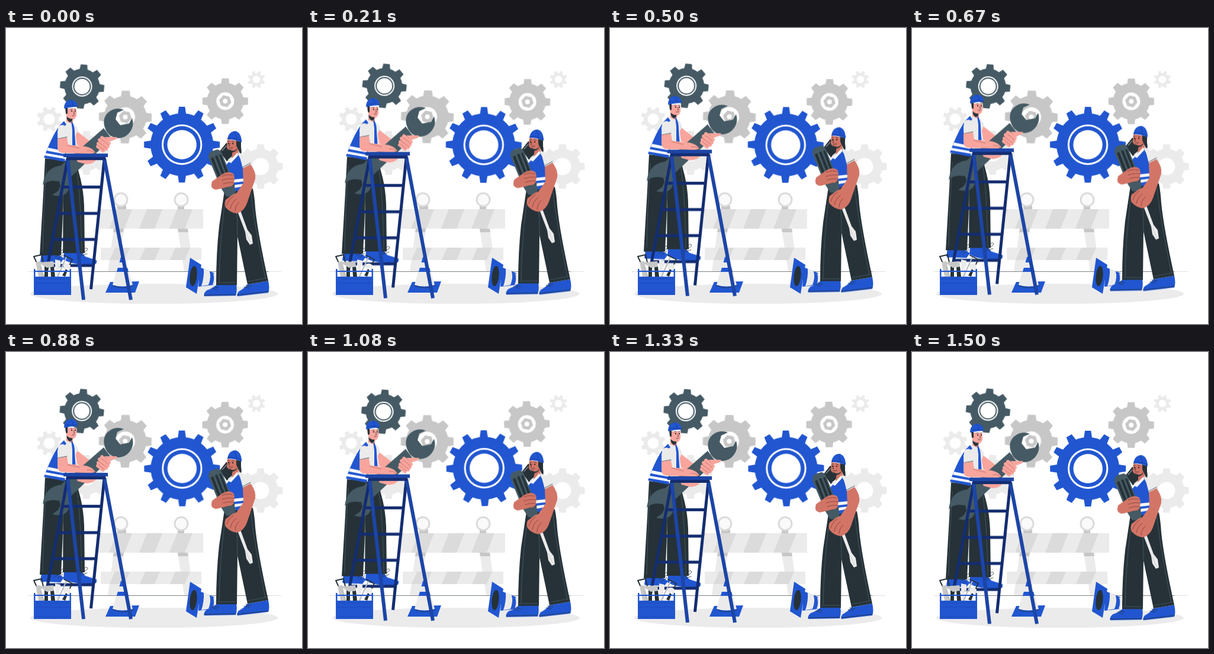
These frames come from a looping animation (500x500 px, 1540 ms). An HTML page:

```html
<!DOCTYPE html>
<html lang="en">
<head>
<meta charset="utf-8">
<title>Maintenance</title>
<style>
html, body { margin: 0; width: 100%; height: 100%; overflow: hidden; background: #fff; }
svg { display: block; width: 100vw; height: 100vh; }
.float { animation: float 1540ms linear -20ms infinite; }
.sway { transform-origin: 250px 161px; animation: sway 1540ms linear -20ms infinite; }
@keyframes float { from, to { transform: translateY(.4px); } 50% { transform: translateY(-9.6px); } }
@keyframes sway { 25% { transform: rotate(1deg); } 75% { transform: rotate(-1deg); } }
.blue { fill: #2156d0; }
.dark { fill: #263238; }
.steel { fill: #455a64; }
.pale { fill: #ebebeb; }
.grey { fill: #dbdbdb; }
.mid { fill: #c7c7c7; }
.white { fill: #fff; }
.peach { fill: #f8a59d; }
.tan { fill: #d27567; }
.line { fill: none; stroke: #263238; stroke-width: .8; stroke-linecap: round; stroke-linejoin: round; }
.seam { fill: none; stroke: #50666f; stroke-width: .7; }
</style>
</head>
<body>
<svg viewBox="0 0 500 500">
  <g id="far"></g>

  <ellipse cx="250" cy="449" rx="209" ry="17" class="pale"/>
  <path class="line" style="stroke-width:.6" d="M47 411.500H443"/>
  <path class="line" style="stroke-width:.6;opacity:.25" d="M37 411.500H47M443 411.500H465"/>

  <g id="near" class="sway"></g>

  <g id="barrier">
    <path class="pale" d="M182 339H199L189 411H172ZM290 339H307L317 411H301Z"/>
    <path class="mid" d="M182 339H199L198 345H181ZM290 339H307L308 345H291ZM188 300H203V306H188ZM290 300H301V306H290Z"/>
    <g fill="#fafafa" stroke="#dbdbdb" stroke-width="3">
      <circle cx="194" cy="290" r="11"/><circle cx="296" cy="290" r="11"/>
    </g>
    <path class="pale" d="M155 306H333V339H155ZM160 371H330V392H160Z"/>
    <path class="grey" d="M187 306H213L200 339H174ZM238 306H264L251 339H225ZM289 306H315L302 339H276ZM155 306H162L155 324Z"/>
    <path class="grey" d="M184 371H209L200 392H175ZM235 371H260L251 392H226ZM286 371H311L302 392H277Z"/>
  </g>

  <g id="cone">
    <path class="blue" d="M176 429L225 428L218 447H168Z"/>
    <path class="blue" d="M194 387Q197 385 200 387L214 436Q197 441 180 436Z"/>
    <path class="pale" d="M191 396H203L206 405H188ZM186 412H208L214 434Q197 439 180 434Z"/>
    <path class="line" d="M180 435Q197 443 215 435"/>
  </g>

  <g id="worker" class="float">
    <path class="blue" d="M60 382L58 394Q59 397 66 396L92 397L98 389L87 382Z"/>
    <path class="blue" d="M98 379L97 391Q110 399 132 399H150Q154 398 153 392L134 386L128 379Z"/>
    <path class="line" d="M83 387L91 382M87 390L96 383M122 383L133 379M125 385L137 381M90 380Q96 371 98 376T91 380M130 378Q133 370 137 372T131 379"/>
    <path class="dark" d="M66 220L119 226Q122 241 126 255Q131 276 132 300L133 380H96L97 292L93 384H57L63 280Z"/>
    <path class="seam" d="M98 262Q96 284 96 310L97 376M68 235Q63 310 62 378M118 234Q126 270 128 378"/>

    <path class="peach" d="M116 171L149 197L158 188L165 202L146 208L120 197Z"/>
    <path class="pale" d="M113 161Q119 164 122 172L117 183Z"/>
    <path class="peach" d="M102 152H113V163L108 169L101 163Z"/>
    <path class="pale" d="M88 165L103 158L113 163L118 210H88Z"/>
    <path class="blue" d="M98 157L91 164Q78 181 64 219L99 226L102 207H88V186L87 174L102 163ZM110 156Q116 163 116 176L118 206H112L112 172Z"/>
    <path class="white" d="M71 202L100 208V213L69 207ZM67 211L100 217V221L65 215Z"/>

    <path class="peach" d="M101 136H118Q121 147 117 152Q113 156 106 155Q100 148 101 136Z"/>
    <path class="dark" d="M100 135H104L104 144Q103 146 101 144ZM102 149Q107 154 112 153Q113 157 108 159Q103 157 102 149Z"/>
    <path class="blue" d="M98 136Q98 123 109 121Q121 122 121 133Q111 133 98 136Z"/>
    <path class="line" style="stroke:#173b95" d="M100 132Q110 129 121 132M109 122Q113 124 113 131"/>
    <circle cx="111" cy="140" r="1"/><circle cx="117" cy="140" r="1"/>
    <path class="line" d="M109 137L112 136.500M116 136.500L118 137M114 141L116 144L114 145M112 148Q115 149 116 147"/>

    <path class="steel" d="M165 169L93 232Q66 235 62 265Q69 258 80 258L90 259L92 267L88 275L78 282Q92 286 102 279Q109 271 109 252L178 187Z"/>
    <path class="steel" d="M199 138Q184 132 172 143Q162 153 167 168Q173 185 190 186Q206 185 213 169Q216 162 213 152L208 161L193 164L185 154L188 143Z"/>
    <path class="peach" d="M166 184L187 184Q189 187 183 189L174 192Z"/>
    <path fill="none" stroke="#f8a59d" stroke-width="5.800" stroke-linecap="round" d="M162 185L174 195M158 189L172 200M156 195L169 204M155 200L164 207"/>
    <path class="line" style="stroke:#b9655f" d="M161 188Q168 192 173 198M157 193Q164 198 170 203M156 198Q161 203 166 206"/>
    <path class="pale" d="M88 166Q97 160 102 168L103 185L87 187Z"/>
    <path class="line" d="M87 187L103 184"/>
    <path class="peach" d="M87 187L103 185L105 197L135 200Q145 202 151 210Q146 213 136 212L98 211Q87 211 87 202ZM118 220Q135 217 152 223Q148 229 136 230L121 226Z"/>
    <path class="line" style="stroke:#b9655f" d="M104 198L124 203M137 207Q144 206 149 210"/>

    <g fill="none" stroke="#142d70" stroke-width="5">
      <path d="M104 222L67 419M166 222L143.500 441"/>
      <path d="M95 268.500H160M87 313H156M79 357H152M71 401H148"/>
    </g>
    <path fill="none" stroke="#1c45a6" stroke-width="6" d="M104 220L131 459M166 220L211 459"/>
    <path fill="#1c45a6" d="M97 212H172V218H97Z"/>
    <path fill="#142d70" d="M102 218H168V223H102Z"/>
  </g>

  <g id="toolbox">
    <path class="line" style="stroke-width:2" d="M53 399L47 386L60 383L63 396"/>
    <path class="mid" d="M50 395L58 394L64 420H55Z"/>
    <path class="dark" d="M65 397L71 396V420H65ZM75 404L81 403L83 420H76ZM95 418L101 407L104 409L100 420Z"/>
    <path class="mid" d="M55 396L80 394L81 403L69 405Z"/>
    <path class="pale" d="M83 391L92 393L92 403L83 404ZM84 402H89L91 420H85ZM96 400Q104 395 109 401L108 409L102 405L99 411Z"/>
    <path class="line" style="stroke:#b5bcc0;stroke-width:2" d="M102 387L87 420M58 404L64 420"/>
    <path class="line" style="stroke-width:1.700" d="M98 384L112 391L108 399"/>
    <path class="blue" d="M47 407H49.500V420H107.500V407H110V451H47Z"/>
    <path class="blue" d="M47 410H110V412H47Z"/>
    <path class="line" style="stroke:#1a47b4" d="M50 424H107M50 431H107M50 447H107"/>
  </g>

  <g id="fallen-cone">
    <path class="blue" d="M327 404L352 414Q356 423 351 434L325 437Z"/>
    <path class="pale" d="M334 406L344 411Q347 422 342 434L330 436Q335 421 334 406ZM350 414L354 416Q357 424 353 433L349 434Q353 424 350 414Z"/>
    <path class="blue" d="M311 388L330 400L322 449L304 438Z"/>
    <ellipse class="dark" cx="316.500" cy="419" rx="6" ry="17" transform="rotate(6 316.500 419)"/>
  </g>

  <g id="engineer" class="float">
    <path class="blue" d="M357 432Q351 439 339 443Q333 448 335 453L388 452Q391 443 389 432ZM408 433Q402 440 393 445Q389 450 391 453L443 447Q446 440 443 427Z"/>
    <path class="line" d="M335 451L388 450M391 451L443 445M351 437L359 439M348 439L356 442M405 434L414 436M402 437L411 439"/>
    <path class="dark" d="M369 275L417 271Q420 286 421 304Q425 345 443 427L408 433L391 352L390 434H355Q355 380 360 335Z"/>
    <path class="seam" d="M388 296Q392 325 391 352M414 279Q417 318 438 423M369 300Q361 365 360 429M409 428L441 422M357 430H389"/>

    <path class="dark" d="M372 194L361 208L373 225L391 211L394 202H397Q399 211 396 215L391 201Z"/>
    <path class="line" style="stroke:#fff" d="M372 199L365 207"/>
    <path class="pale" d="M375 222L390 210Q405 213 413 229L402 242V269L385 272Z"/>
    <path class="tan" d="M383 205L392 201L393 211L381 222Z"/>
    <path class="blue" d="M372 231L380 222L391 212Q400 225 402 240V273L386 276Z"/>
    <path class="white" d="M376 226L391 210L392 215L380 228ZM382 256L402 254V259L384 261ZM385 265L402 263V267L386 270Z"/>

    <path class="tan" d="M374 188L393 191Q394 203 387 208Q378 210 373 202Z"/>
    <path class="dark" d="M389 190L397 192L397 210Q391 205 389 198ZM376 204Q384 211 391 203Q389 209 382 210Q378 209 376 204Z"/>
    <path class="blue" d="M374 188Q376 174 388 174Q398 177 398 193Q387 188 374 188Z"/>
    <path class="line" style="stroke:#173b95" d="M375 186Q386 185 398 190M384 175Q389 178 389 186"/>
    <circle cx="376" cy="195" r="1"/><circle cx="383" cy="195" r="1"/>
    <path class="line" d="M374 192L377 191.500M382 191L385 192M378 195L376 199H378M377 202Q380 204 383 202"/>

    <path class="pale" d="M382 286L387 284L408 341L415 350L417 364L412 366L406 357L404 344Z"/>
    <path class="line" style="stroke:#c7c7c7" d="M406 346L413 362"/>
    <path class="steel" d="M342 219Q341 211 347 208L357 205Q363 206 365 212L386 265L388 281Q379 286 372 284L363 270Z"/>
    <path class="dark" d="M346 220L350 218L366 259L362 261ZM353 216L357 215L373 256L369 258ZM360 214L363 213L380 255L376 257Z"/>
    <path class="line" d="M363 270Q375 270 386 265"/>

    <path class="tan" d="M348 259L365 247Q377 240 384 246Q387 251 385 262Q383 268 376 268L355 273Q346 272 347 264Z"/>
    <path class="line" style="stroke:#823d38" d="M365 250Q375 246 383 249M365 257Q376 253 385 255M367 263Q376 260 384 261"/>
    <path class="pale" d="M393 210Q406 214 413 229L400 237Z"/>
    <path class="line" d="M400 235L413 228"/>
    <path class="tan" d="M400 237L413 230Q423 243 421 255L407 296Q402 310 390 313Q379 312 371 303Q368 297 371 290L383 281L389 279L401 262Z"/>
    <path class="line" style="stroke:#823d38" d="M373 299Q376 289 384 284M379 305Q381 294 389 289M387 309Q387 300 394 294"/>
  </g>
</svg>
<script>
const NS = 'http://www.w3.org/2000/svg';

function add(parent, tag, attrs) {
  const el = document.createElementNS(NS, tag);
  for (const k in attrs) el.setAttribute(k, attrs[k]);
  parent.appendChild(el);
  return el;
}

// Disc with tapered teeth, then concentric rings [radius, colour].
function gear(layer, x, y, outer, body, teeth, fill, tilt, rings) {
  const g = add(layer, 'g', { transform: `translate(${x} ${y}) rotate(${tilt})` });
  const tip = outer * (teeth > 8 ? .08 : .147);
  const root = outer * (teeth > 8 ? .11 : .185);
  add(g, 'circle', { r: body, fill });
  for (let i = 0; i < teeth; i++) {
    add(g, 'path', {
      d: `M${-root} ${2 - body}L${-tip} ${-outer}H${tip}L${root} ${2 - body}Z`,
      transform: `rotate(${i * 360 / teeth})`, fill
    });
  }
  for (const [r, c] of rings) add(g, 'circle', { r, fill: c });
  return g;
}

function nut(g, r, hole, fill) {
  const pts = Array.from({ length: 6 }, (_, i) => {
    const a = i * Math.PI / 3 + .2;
    return [r * Math.cos(a), r * Math.sin(a)];
  });
  add(g, 'polygon', { points: pts.join(' '), fill });
  add(g, 'circle', { r: hole, fill: '#fff' });
}

const far = document.getElementById('far');
const near = document.getElementById('near');
const W = '#fff', PALE = '#ebebeb', MID = '#c7c7c7', BLUE = '#2156d0', STEEL = '#455a64';

gear(far, 73, 154, 21, 16, 8, PALE, 22.5, [[9.5, W]]);
gear(far, 136, 211, 37, 30, 8, PALE, 0, [[14.5, W]]);
gear(far, 430, 234, 37.5, 30, 8, PALE, 0, [[14.5, W]]);
gear(far, 423, 87, 14.7, 11, 8, PALE, 22.5, [[6.3, W]]);

nut(gear(near, 201.5, 150.5, 44.5, 36, 8, MID, 1, [[16.5, W]]), 11, 4, MID);
nut(gear(near, 370.3, 123.5, 38.5, 31, 8, MID, 0, [[15, W]]), 10.5, 4, MID);
gear(near, 128.5, 99, 37.3, 30, 8, STEEL, 5, [[17, W], [15, STEEL], [13, W]]);
gear(near, 297.2, 197, 64, 53, 12, BLUE, 0, [[34.2, W], [31.2, BLUE], [24.7, W]]);
</script>
</body>
</html>
```
